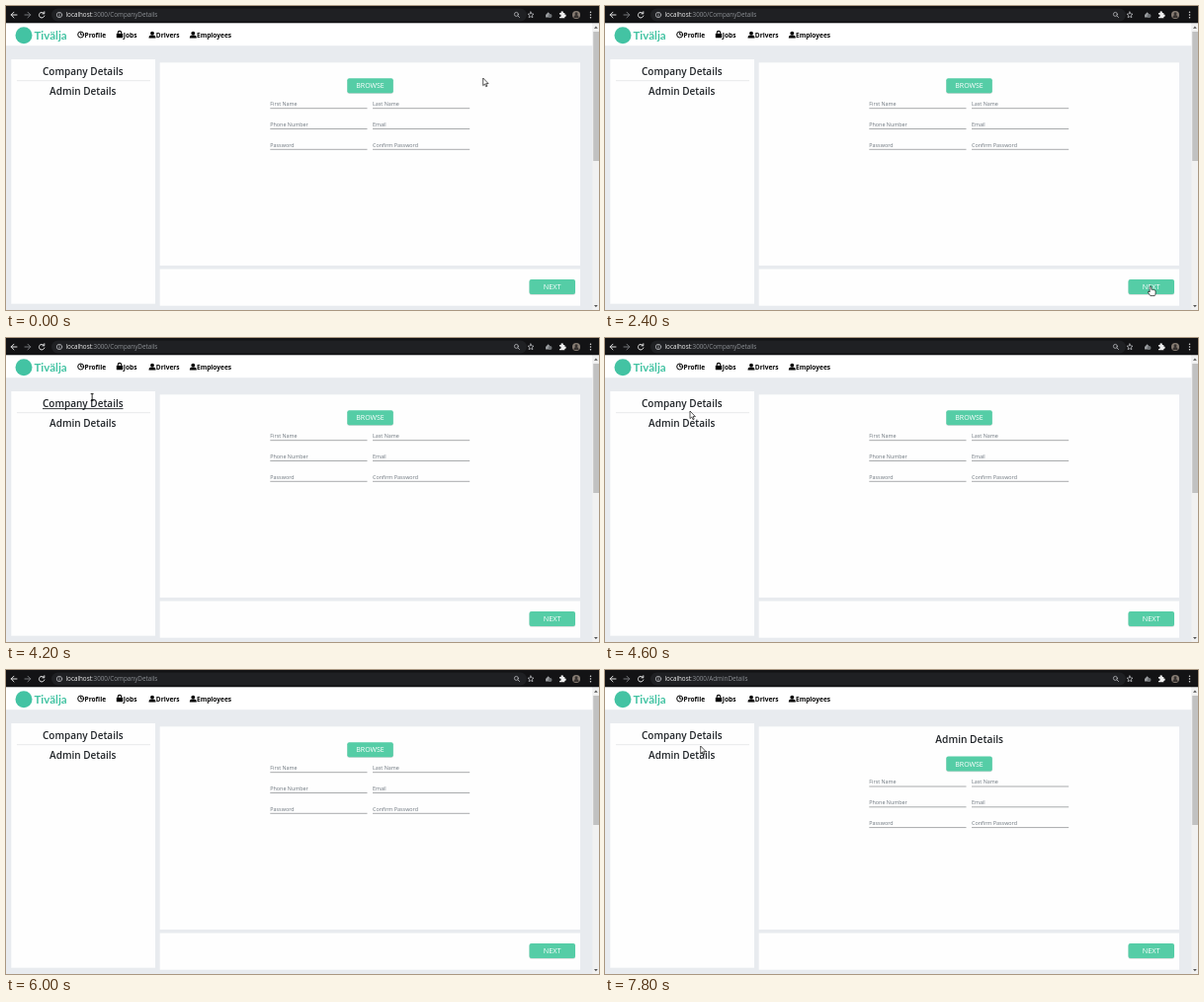
Recreate the animation shown at these times as an HTML page. Size 600 by 308 pixels, loop 8000 ms.

```html
<!DOCTYPE html>
<html lang="en">
<head>
<meta charset="utf-8">
<title>Company Details</title>
<style>
  html, body { margin: 0; width: 100%; height: 100%; overflow: hidden; background: #e8ebef; }
  svg { display: block; width: 600px; height: 308px; font-family: "Open Sans", "Noto Sans", sans-serif; }
  .mid { text-anchor: middle; }
  .head { font-size: 10px; font-weight: 600; fill: #212529; text-anchor: middle; }
  .nav text { font-size: 6.6px; font-weight: 700; fill: #050505; }
  .label { font-size: 5.4px; fill: #6c757d; }
  .line { fill: none; stroke-linecap: round; stroke-linejoin: round; }
</style>
</head>
<body>
<svg viewBox="0 0 600 308">
  <rect width="600" height="308" fill="#e8ebef"/>

  <!-- browser bar -->
  <rect width="600" height="17.5" fill="#131315"/>
  <rect x="46" y="2.5" width="481" height="13" rx="6.5" fill="#1f2023"/>
  <g class="line" stroke="#e4e4e4" stroke-width="1">
    <path d="M11 9H5.2M8 6.2 5.2 9 8 11.8"/>
    <path d="M19 9h5.8M22 6.2 24.8 9 22 11.8" stroke="#77797c"/>
    <path d="M38.4 7.4A2.8 2.8 0 1 0 38.9 10M38.8 5.8V7.8H36.8"/>
    <g stroke="#b5b7ba" stroke-width=".8">
      <circle cx="54" cy="9" r="2.7"/><path d="M54 8.8V10.4M54 7.4V7.5"/>
      <circle cx="516.4" cy="8.4" r="2"/><path d="M518 10 519.6 11.6"/>
      <path d="M531 6 531.9 8 534 8.2 532.4 9.6 532.9 11.7 531 10.6 529.1 11.7 529.6 9.6 528 8.2 530.1 8Z"/>
    </g>
  </g>
  <text x="60.5" y="11.3" font-size="6.3" fill="#8e9196"><tspan fill="#f1f1f1">localhost</tspan>:3000/<tspan id="route"></tspan></text>
  <path d="M546 11.5v-2.5l2.6-2.8 2.6 2.8v2.5z" fill="#9b9da0"/>
  <circle cx="550.5" cy="10" r="2" fill="#6d7073"/>
  <path d="M560 7h1.6a1.2 1.2 0 1 1 2.2 0h1.5v1.7a1.1 1.1 0 1 1 0 2.1v1.5h-5.3v-1.6a1.1 1.1 0 1 0 0-2z" fill="#efefef"/>
  <circle cx="577" cy="9" r="4" fill="#877c73"/>
  <path d="M574.5 12a2.5 3 0 0 1 5 0z" fill="#36312f"/><circle cx="577" cy="7.8" r="1.5" fill="#36312f"/>
  <g fill="#e4e4e4"><circle cx="591.5" cy="6.3" r=".75"/><circle cx="591.5" cy="9" r=".75"/><circle cx="591.5" cy="11.7" r=".75"/></g>

  <!-- navigation -->
  <rect y="17.5" width="593.5" height="22.7" fill="#fff"/>
  <rect id="navHover" y="18" height="22" fill="#e7e7e8"/>
  <circle cx="18" cy="29.7" r="8.5" fill="#43c3a3"/>
  <text x="28.5" y="34" font-family="Lato, sans-serif" font-size="11.5" font-weight="700" fill="#43c3a3">Tivälja</text>
  <g class="nav" id="nav">
    <g class="line" stroke="#050505" stroke-width="1"><circle cx="75.7" cy="29" r="3"/><path d="M75.7 27V29.2H77.2"/></g>
    <rect x="111.8" y="28" width="6.4" height="4.3" rx=".6"/>
    <path class="line" d="M113.2 28.5V27.2a1.8 1.8 0 0 1 3.6 0V28.5" stroke="#050505" stroke-width="1.1"/>
  </g>

  <!-- scrollbar -->
  <rect x="593.5" y="17.5" width="6.5" height="290.5" fill="#f1f1f1"/>
  <rect x="594.2" y="26" width="5.8" height="131" fill="#c1c1c1"/>
  <path d="M595 22.7 596.9 20.5 598.8 22.7zM595 303 596.9 305.2 598.8 303z" fill="#555"/>

  <!-- panels -->
  <g fill="#fefefe">
    <rect x="5.3" y="54" width="145.7" height="247.7"/>
    <rect x="155.7" y="57.3" width="425.3" height="205.7"/>
    <rect x="155.7" y="266.5" width="425.3" height="37.2"/>
  </g>
  <path d="M11 75.7H146" stroke="#e3e4e6" stroke-width=".8"/>
  <text class="head" x="77.8" y="70">Company Details</text>
  <text class="head" x="77.8" y="90">Admin Details</text>
  <path id="underline" stroke="#212529" stroke-width=".9"/>

  <text class="head" id="title" x="368.7" y="73.6" style="font-size:10.2px">Admin Details</text>
  <g id="form"></g>
  <g id="footer"></g>

  <g id="cursor" stroke="#111" stroke-width=".7" stroke-linejoin="round">
    <path id="arrow" d="M0 0V7.6L1.8 6 3 8.7 4.2 8.2 3 5.6H5.4Z" fill="#fff"/>
    <path id="hand" d="M-.9.4Q0-.5.9.4V3.4Q1.8 2.8 2.5 3.6 3.3 3.1 4 4 5 3.8 5.1 4.8V7Q5 8.4 4.2 9.6H-.2L-2.6 6.2Q-2.8 5.1-1.8 5.1L-.9 6Z" fill="#fff"/>
    <path id="beam" d="M-1.4-3.5H1.4M0-3.5V3.5M-1.4 3.5H1.4" fill="none" stroke-width=".9"/>
  </g>
</svg>
<script>
const $ = id => document.getElementById(id);
const add = (id, markup) => $(id).insertAdjacentHTML('beforeend', markup);

const button = (x, y, label, size) => `
  <rect x="${x}" y="${y + .7}" width="46.5" height="15" rx="2" fill="#bfc9c6" opacity=".7"/>
  <rect x="${x}" y="${y}" width="46.5" height="15" rx="2" fill="#55cda6"/>
  <text class="mid" x="${x + 23.2}" y="${y + 10.1}" font-size="${size}" fill="#fff">${label}</text>`;

const field = (label, i) => {
  const x = i % 2 ? 371 : 267.3, y = 101 + 20.8 * Math.floor(i / 2);
  return `<text class="label" x="${x}" y="${y}">${label}</text>
    <path d="M${x} ${y + 2.7}h98.2" stroke="#8d8f92" stroke-width=".75"/>`;
};

const person = x => `<circle cx="${x}" cy="27.6" r="1.9"/>
  <path d="M${x - 3.5} 32.4q0-2.6 2.6-2.8h1.8q2.6.2 2.6 2.8z"/>`;

[['Profile', 79.5], ['Jobs', 118.8], ['Drivers', 151.8], ['Employees', 193]]
  .forEach(([name, x]) => add('nav', `<text x="${x}" y="31.7">${name}</text>`));
add('nav', person(148) + person(189.3));
add('form', button(345.3, 73.3, 'BROWSE', 7) +
  ['First Name', 'Last Name', 'Phone Number', 'Email', 'Password', 'Confirm Password'].map(field).join(''));
add('footer', button(529.5, 277, 'NEXT', 7.3));

// [time, x, y] of the pointer
const path = [
  [0, 482.7, 73], [1000, 424, 236], [1200, 424, 236], [1400, 419, 262],
  [2000, 552, 284], [2400, 552, 284], [3000, 103, 31], [3200, 98.7, 28],
  [3600, 98.7, 28], [4400, 85, 66], [4600, 86, 74], [4800, 92, 77],
  [5400, 150, 10], [6200, 150, 10], [7000, 98, 92], [7400, 98, 91],
  [7600, 97, 79], [7800, 96.7, 77], [8000, 96.7, 77]
];
// hover areas: kind, left, top, right, bottom
const areas = [
  ['nav', 67, 18, 106, 40], ['nav', 106, 18, 140, 40],
  ['nav', 140, 18, 181, 40], ['nav', 181, 18, 233, 40],
  ['link', 37, 60, 118.5, 73], ['link', 44, 81, 112, 95],
  ['button', 529, 277, 576, 292]
];
const LOOP = 8000, STEP = 200, PAGE_CHANGE = 7200;

function pointerAt(t) {
  const i = path.findIndex(p => p[0] > t);
  const [t0, x0, y0] = path[i - 1], [t1, x1, y1] = path[i];
  const u = (t - t0) / (t1 - t0), k = u * u * (3 - 2 * u);
  return [x0 + (x1 - x0) * k, y0 + (y1 - y0) * k];
}

const show = (id, on) => $(id).setAttribute('visibility', on ? 'visible' : 'hidden');

function draw(time) {
  const t = Math.floor(time % LOOP / STEP) * STEP;
  const [x, y] = pointerAt(t);
  const [kind, l, top, r, b] =
    areas.find(a => x >= a[1] && x < a[3] && y >= a[2] && y < a[4]) || ['none', 0, 0, 0, 0];
  const inPage = y > 17;

  $('cursor').setAttribute('transform', `translate(${x} ${y})`);
  show('arrow', inPage && kind === 'none');
  show('hand', kind === 'nav' || kind === 'button');
  show('beam', kind === 'link');

  show('navHover', kind === 'nav');
  $('navHover').setAttribute('x', l);
  $('navHover').setAttribute('width', r - l);
  show('underline', kind === 'link');
  $('underline').setAttribute('d', `M${l} ${top < 80 ? 71.6 : 91.6}H${r}`);

  const admin = t >= PAGE_CHANGE;
  show('title', admin);
  $('form').setAttribute('transform', `translate(0 ${admin ? 14.3 : 0})`);
  $('route').textContent = admin ? 'AdminDetails' : 'CompanyDetails';
}

const start = performance.now();
function tick() {
  draw(performance.now() - start);
  requestAnimationFrame(tick);
}
tick();
</script>
</body>
</html>
```
